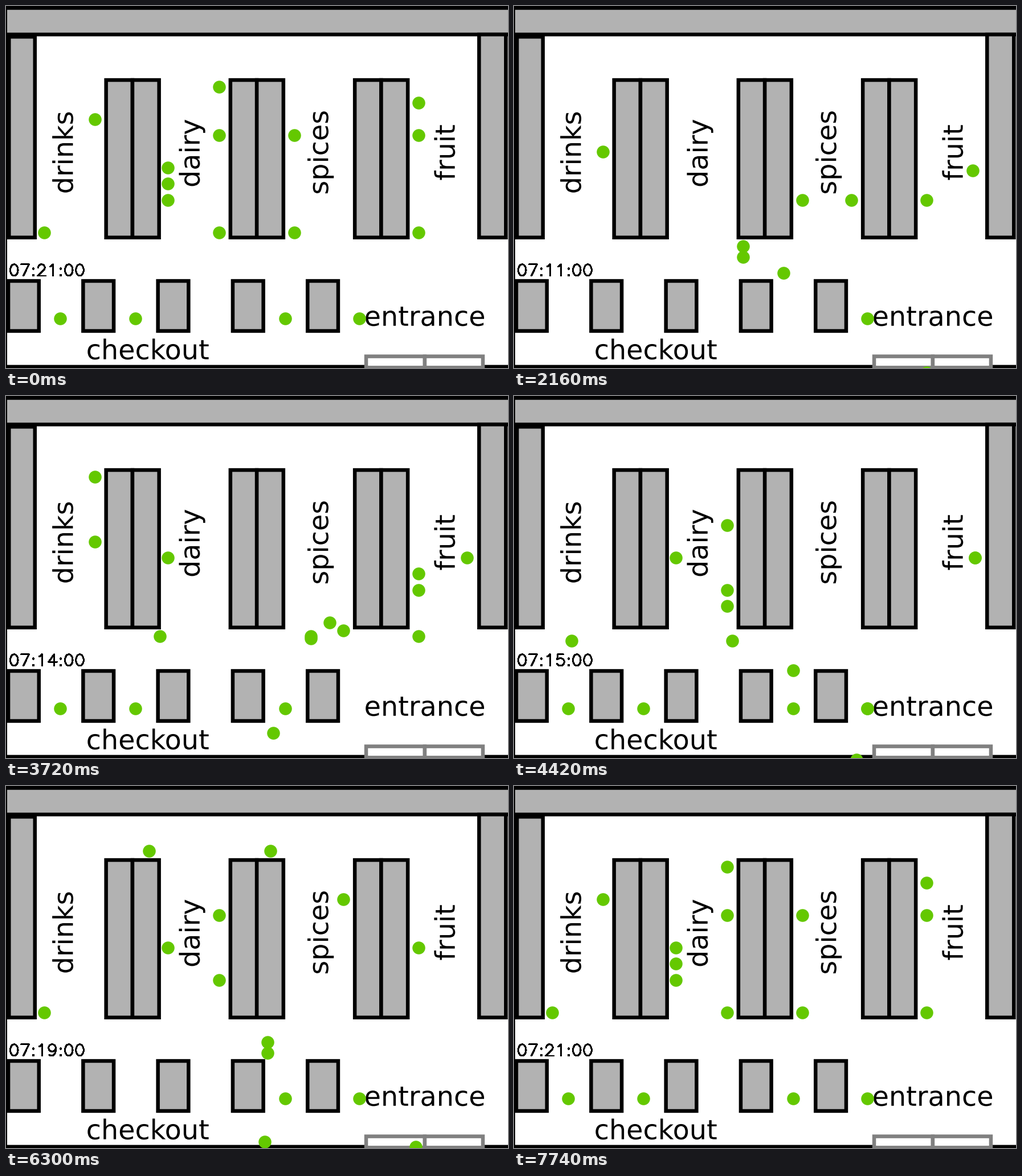
Recreate the animation shown at these times as a matplotlib script. Size 881x636 px, loop 7.84 s.

```python
import numpy as np
import matplotlib.pyplot as plt
from matplotlib.animation import FuncAnimation
from matplotlib.patches import PathPatch, Rectangle
from matplotlib.textpath import TextPath
from matplotlib.transforms import Affine2D

W, H, DPI = 881, 636, 64
TICK, FRAMES = 20, 392
GREY, GREEN = "#b2b2b2", "#64c800"
PX = 72 / DPI

# Shop floor: shelf columns A-H with rows 0-9, tills T1-T4, door IN / EX
COLS = dict(zip("ABCDEFGH", (66.5, 156, 284, 374, 506, 591.7, 724, 809)))
TILLS = (95, 227, 490, 620)
TOP_LANE, LOW_LANE = 114, 430
WALK = 56

# start ms, steps, step at which "@x,y" is passed, walks ("^" takes the top lane)
MINUTES = [
    (20, 7, 0, "IN>G6 IN>G7 IN>G8 IN>G9"),
    (420, 15, 0, "G6^D9 G7>T2 G8>A6 G9>A9 IN>H1 IN>H8"),
    (960, 16, 0, "T2>EX H1>F3 A9>T1 IN>G2 IN>G8"),
    (1480, 16, 0, "H8>T4 A6>B4 D9>T3 G2>E2 G8>F7 T1>EX IN>E7 IN>G7 IN>F4"),
    (2040, 17, 6, "E2>A1@402,422 F4>T2@402,441 F3>T3@473,469 IN>H5@805,289 "
                  "T3>EX@724,644"),
    (2600, 18, 0, "A1^B0 E7>T1 F7>T2 T4>EX T2>EX T3>EX IN>H3 IN>D4 IN>A6 "
                  "IN>E8 IN>F6"),
    (3120, 17, 0, "A6>C5 H3>F3 E8>T2 F6>T3 IN>F1 IN>F4 IN>F5 IN>G6"),
    (3640, 13, 4, "D4>T1@270,422 F5>D7@535,422 F4>T2@535,426 F3>D0@568,398 "
                  "F1>T4@592,412 IN>H5@724,422 T2>EX@469,592"),
    (4140, 19, 0, "B0^D3 B4>T3 D0>T1 G6>T4 G7>D8 T1>EX T2>EX IN>C8"),
    (4640, 12, 0, "T1>EX IN>G3 IN>G5"),
    (5080, 14, 5, "T1>EX@388,610 T3>EX@653,629 T4>EX@620,530"),
    (5620, 17, 0, "D8>A9 G3>F2 H5>T3 IN>G1 IN>B6"),
    (6160, 17, 7, "B6>C7@251,114 G1>D2@464,114 H5>A6@459,450 C8>T2@459,469 "
                  "T2>EX@454,625 T3>EX@719,634"),
    (6740, 16, 0, "A6>B2 D2>D0 F2>E3 G5>G3 T4>EX T3>EX IN>G9 IN>E9 IN>C6 "
                  "IN>G8 IN>F7 IN>F8"),
    (7400, 18, 0, "A9>T1 F7^A9 F8>T3 G8>T4 D7>D9 IN>G1"),
]


def place(spot):
    if spot == "IN":
        return 724, 650
    if spot == "EX":
        return 720, 650
    if spot[0] == "T":
        return TILLS[int(spot[1]) - 1], 549
    return COLS[spot[0]], 142 + 28.4 * int(spot[1])


def aisle(spot):
    return 3 if spot == "IN" else "ABCDEFGH".find(spot[0]) // 2


def route(word):
    """Waypoints of a walk and the index of its timed point, if any."""
    head, _, via = word.partition("@")
    a, b, top = head[:2], head[-2:], "^" in head
    (ax, ay), (bx, by) = place(a), place(b)
    mid = [tuple(map(float, via.split(",")))] if via else []
    if b == "EX":
        y = min(590, mid[0][1]) if mid else 590
        before, after = [(85 if a == "T1" else ax, y)], []
    elif top or aisle(a) != aisle(b):
        lane = mid[0][1] if mid else TOP_LANE if top else LOW_LANE
        before = [(ax, lane)]
        after = [(85 if b == "T1" else bx, lane)]
    else:
        before, after = [], []
    pts = [(ax, ay)] + before + mid + after + [(bx, by)]
    return np.array(pts), 1 + len(before) if mid else 0


def lengths(pts):
    return np.r_[0, np.cumsum(np.hypot(*np.diff(pts, axis=0).T))]


def schedule(walks, steps, via_step):
    """Arrival step at each waypoint for every walk of one minute."""
    routes = [route(w) for w in walks]
    speed = max(lengths(p)[-1] for p, _ in routes) / (steps - 1)
    plan = []
    for pts, k in routes:
        d = lengths(pts)
        if k:
            v = max(WALK, (d[-1] - d[k]) / (steps - 1 - via_step))
            t = np.where(d <= d[k], d / d[k] * via_step, via_step + (d - d[k]) / v)
        else:
            t = d / speed
        plan.append((t, pts))
    return plan


def simulate():
    """Minute and dot positions for every tick."""
    scenes = [None] * FRAMES
    spots = []
    ends = [m[0] // TICK for m in MINUTES[1:]] + [FRAMES]
    for n, (start, steps, via_step, text) in enumerate(MINUTES):
        walks = text.split()
        for w in walks:
            if w[:2] != "IN":
                spots.remove(w[:2])
        idle = [place(s) for s in spots]
        plan = schedule(walks, steps, via_step)
        first = start // TICK
        for f in range(first, ends[n]):
            moving = [(np.interp(f - first, t, p[:, 0]), np.interp(f - first, t, p[:, 1]))
                      for t, p in plan]
            scenes[f] = (7 + n, np.array(idle + moving))
        spots += [w.partition("@")[0][-2:] for w in walks if "EX" not in w]
    scenes[0] = scenes[-1]
    return scenes


def arc(cx, cy, rx, ry, a, b):
    t = np.radians(np.linspace(a, b, 25))
    return list(zip(cx + rx * np.cos(t), cy + ry * np.sin(t)))


# Single-stroke digits in a 20 x 21 box, y up
GAP = [(np.nan, np.nan)]
SIX = arc(11.5, 10.5, 7.5, 10.5, 55, 180) + arc(10.5, 6.5, 6.5, 6.5, 180, -180)
STROKES = {
    "0": arc(10, 10.5, 7, 10.5, 0, 360),
    "1": [(6, 17), (8, 18), (11, 21), (11, 0)],
    "2": arc(10, 15, 6, 6, 180, -35) + [(3, 0), (17, 0)],
    "3": [(5, 21), (16, 21), (10, 13)] + arc(10, 6.5, 7, 6.5, 90, -150),
    "4": [(13, 0), (13, 21), (3, 7), (18, 7)],
    "5": [(15, 21), (5, 21), (4, 12)] + arc(10, 7, 7, 7, 140, -150),
    "6": SIX,
    "7": [(3, 21), (17, 21), (7, 0)],
    "8": arc(10, 16, 5.5, 5, -90, 270) + arc(10, 5.5, 7, 5.5, 90, -270),
    "9": [(20 - x, 21 - y) for x, y in SIX],
    ":": arc(5, 13, 0.6, 0.6, 0, 360) + GAP + arc(5, 1, 0.6, 0.6, 0, 360),
}


def clock_path(text, x=4.7, y=474, scale=0.96):
    pts = []
    for ch in text:
        pts += [(x + scale * px, y - scale * py) for px, py in STROKES[ch]] + GAP
        x += scale * (10 if ch == ":" else 20)
    return np.array(pts).T


fig = plt.figure(figsize=(W / DPI, H / DPI), dpi=DPI, facecolor="white")
ax = fig.add_axes([0, 0, 1, 1])
ax.set(xlim=(0, W), ylim=(H, 0))
ax.axis("off")


def box(x0, y0, x1, y1, color):
    ax.add_patch(Rectangle((x0, y0), x1 - x0, y1 - y0, fc=color, lw=0, snap=False))


def shelf(x0, y0, x1, y1, fill=GREY, edge="black", b=6.5):
    box(x0, y0, x1, y1, edge)
    box(x0 + b, y0 + b, x1 - b, y1 - b, fill)


def label(word, x, y, turn=0):
    path = TextPath((0, 0), word, size=47.7, prop={"family": "DejaVu Sans"})
    move = Affine2D().scale(1, -1).rotate_deg(-turn).translate(x, y)
    ax.add_patch(PathPatch(path.transformed(move), fc="black", lw=0))


box(0, 0, 2, H, "black")
box(0, 630.6, W, H, "black")
box(0, 0, W, 53.3, "black")
box(2, 6.7, W, 46.8, GREY)
shelf(2, 50.8, 54, 410)
shelf(827, 46.8, 880.5, 410)
for x in (172.4, 390.6, 608.9):
    shelf(x, 126.8, x + 52.8, 410)
    shelf(x + 46.3, 126.8, x + 99.5, 410)
for i in range(5):
    x = 0.8 + 131.3 * i
    shelf(x, 479.8, x + 60.2, 574.2)
shelf(628.8, 612.3, 738.2, 638.5, "white", "#808080")
shelf(731.7, 612.3, 840.2, 638.5, "white", "#808080")

label("drinks", 117.4, 330.3, 90)
label("dairy", 339.7, 319, 90)
label("spices", 565.3, 331.7, 90)
label("fruit", 787.6, 306.7, 90)
label("checkout", 140.7, 620.6)
label("entrance", 628.6, 561.8)

clock, = ax.plot([], [], color="black", lw=2 * PX, aa=False,
                 solid_capstyle="round", solid_joinstyle="round")
dots = ax.scatter([], [], s=(22.5 * PX) ** 2, color=GREEN, lw=0, zorder=5,
                  antialiased=False)
SCENES = simulate()


def draw(i):
    minute, pos = SCENES[i]
    clock.set_data(*clock_path(f"07:{minute:02d}:00"))
    dots.set_offsets(pos)
    return clock, dots


anim = FuncAnimation(fig, draw, frames=FRAMES, interval=TICK, repeat=True,
                     repeat_delay=0, blit=False)
plt.show()
```
